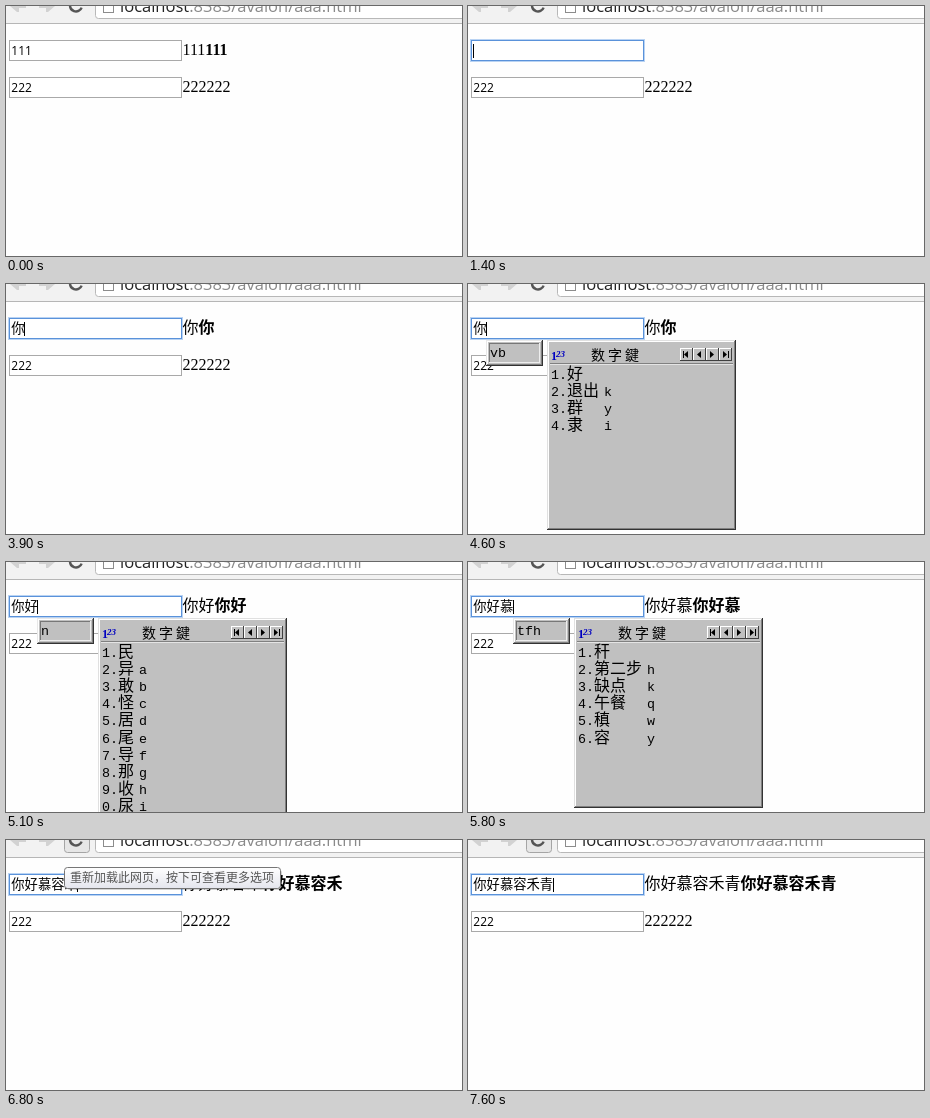
An HTML page with a canvas for the animation above (8000 ms loop, 456x250 px).

```html
<!DOCTYPE html>
<html lang="zh">
<head>
<meta charset="utf-8">
<style>
  html, body { margin: 0; width: 100%; height: 100%; overflow: hidden; background: #fefefe; }
  canvas { display: block; }
</style>
</head>
<body>
<canvas id="stage" width="456" height="250"></canvas>
<script>
const c = document.getElementById('stage').getContext('2d');
const CJK = '"Noto Sans CJK SC", "Noto Sans CJK", sans-serif';
const PAGE = '"Liberation Serif", "Noto Sans CJK SC", serif';
const UI = '"Open Sans", ' + CJK;
const MONO = '"Liberation Mono", monospace';
const LOOP = 8000;

// Candidate lists: "word code" entries
const LISTS = {
  w: '人,代 a,他 b,公 c,估 d,仍 e,会 f,全 g,个 h,介 i',
  wq: '你,欠 b,仰 b,歉 w,伤 l,余 y',
  v: '发,好 b,妈 c,姑 d,妥 e,妹 f,姨 g,奶 h,婚 i,女 j',
  vb: '好,退出 k,群 y,隶 i',
  n: '民,异 a,敢 b,怪 c,居 d,尾 e,导 f,那 g,收 h,尿 i',
  ng: '慢,忆 n,懂 a,悟 k,恒 j,惜 a',
  ngk: '慕,属于 g,惯 m,怀 i',
  ngkd: '慕,改善 u',
  t: '和,长 a,季 b,么 c,知 d,秀 e,行 f,生 g,处 h,秒 i',
  tf: '行,先 q,午 j,告 k,乘 u,科 f',
  tfh: '秆,第二步 h,缺点 k,午餐 q,稹 w,容 y',
  g: '一,开 a,屯 b,到 c,天 d,表 e,于 f,五 g,下 h,不 i',
  gh: '下,理 f,政 t,整 g,玩 q,禾 d',
  ghd: '禾,整 g,丙 w',
  u: '产,并 a,闻 b,冯 c,关 d,前 e,半 f,着 g,站 h,冰 i',
  ug: '关,美 d,差 a,养 j,青 u'
};

// [time, field text, pending input code]
const STEPS = [
  [0, '111'], [1200, '11'], [1300, '1'], [1400, ''],
  [2100, 'd'], [2200, 'dd'], [2300, 'ddd'], [2400, 'dddd'], [2600, 'ddddd'],
  [2800, 'dddd'], [2900, 'ddd'], [3000, 'dd'], [3100, 'd'], [3200, ''],
  [3700, '', 'w'], [3800, '', 'wq'], [3900, '你'],
  [4500, '你', 'v'], [4600, '你', 'vb'], [4700, '你好'],
  [5100, '你好', 'n'], [5200, '你好', 'ng'], [5300, '你好', 'ngk'], [5400, '你好', 'ngkd'],
  [5500, '你好慕'], [5600, '你好慕', 't'], [5700, '你好慕', 'tf'], [5800, '你好慕', 'tfh'],
  [5900, '你好慕容'], [6000, '你好慕容', 'g'], [6100, '你好慕容', 'gh'], [6200, '你好慕容', 'ghd'],
  [6300, '你好慕容禾'], [7400, '你好慕容禾', 'u'], [7500, '你好慕容禾', 'ug'], [7600, '你好慕容禾青']
];

function rect(x, y, w, h, color) {
  c.fillStyle = color;
  c.fillRect(x, y, w, h);
}

function frame(x, y, w, h, color) {
  c.strokeStyle = color;
  c.lineWidth = 1;
  c.strokeRect(x + .5, y + .5, w - 1, h - 1);
}

function text(s, x, y, font, color = '#000') {
  c.font = font;
  c.fillStyle = color;
  c.fillText(s, x, y);
  return x + c.measureText(s).width;
}

function rounded(x, y, w, h, r, fill, stroke) {
  c.beginPath();
  c.roundRect(x + .5, y + .5, w - 1, h - 1, r);
  c.fillStyle = fill;
  c.fill();
  c.strokeStyle = stroke;
  c.lineWidth = 1;
  c.stroke();
}

function poly(points, color) {
  c.beginPath();
  points.forEach(([x, y]) => c.lineTo(x, y));
  c.fillStyle = color;
  c.fill();
}

function bevel(x, y, w, h, light, dark) {
  rect(x, y, w, h, dark);
  rect(x, y, w - 1, h - 1, light);
  rect(x + 1, y + 1, w - 2, h - 2, '#c0c0c0');
}

function toolbar(hover) {
  rect(0, 0, 456, 17, '#f2f2f2');
  rect(0, 17, 456, 1, '#b6b6b6');
  rounded(89, -12, 380, 25, 3, '#fff', '#b8b8b8');
  if (hover) rounded(58, -12, 26, 25, 3, '#e6e6e6', '#a5a5a5');
  poly([[4, 0], [20, 0], [20, 2], [13, 2], [13, 6], [11, 6]], '#d2d2d2');
  poly([[33, 0], [49, 0], [42, 6], [40, 6], [40, 2], [33, 2]], '#d2d2d2');
  c.beginPath();
  c.arc(70, -.5, 6, .35, Math.PI);
  c.strokeStyle = '#555';
  c.lineWidth = 2.4;
  c.stroke();
  frame(97, -8, 11, 15, '#8c8c8c');
  const x = text('localhost', 114, 6, '16.5px ' + UI, '#222');
  text(':8383/avalon/aaa.html', x, 6, '16.5px ' + UI, '#8a8a8a');
}

function field(y, value, focused) {
  rect(3, y, 173, 21, '#fff');
  if (focused) {
    frame(2, y - 1, 175, 23, '#b9d3f3');
    frame(3, y, 173, 21, '#5a92da');
  } else {
    frame(3, y, 173, 21, '#a9a9a9');
  }
  const font = value > '\u00ff' ? '13.3px ' + CJK : '12px ' + UI;
  const end = text(value, 5.3, y + 15, font);
  const caret = Math.floor(end);
  if (focused) rect(caret, y + 4, 1, 14, '#000');
  return caret;
}

function output(value, y, bold) {
  const x = text(value, 176.5, y, '16px ' + PAGE);
  text(value, x, y, (bold ? 'bold ' : '') + '16px ' + PAGE);
}

function pager(x, y) {
  for (let i = 0; i < 4; i++) {
    const l = x + i * 13.3 | 0, d = i < 2 ? -1 : 1, m = l + 6;
    bevel(l, y, 13, 13, '#fff', '#404040');
    poly([[m - 2 * d, y + 3], [m + 2 * d, y + 6.5], [m - 2 * d, y + 10]], '#000');
    if (i % 3 == 0) rect(m + 3 * d, y + 3, 1, 7, '#000');
  }
}

function ime(x, code) {
  bevel(x, 56, 57, 26, '#e8e8e8', '#333');
  bevel(x + 1, 57, 55, 24, '#fff', '#808080');
  bevel(x + 3, 59, 51, 20, '#777', '#eee');
  text(code, x + 4, 73, '13.33px ' + MONO);

  const l = x + 61, rows = LISTS[code].split(',').map(s => s.split(' '));
  const h = rows.length > 9 ? 200 : 190;
  bevel(l, 56, 189, h, '#e0e0e0', '#333');
  bevel(l + 1, 57, 187, h - 2, '#fff', '#808080');
  rect(l + 3, 79, 183, 1, '#808080');
  rect(l + 3, 80, 183, 1, '#e4e4e4');
  text('1', l + 4, 76, 'bold 12px "Liberation Serif", serif', '#0000c0');
  text('23', l + 9, 73, 'italic bold 9px "Liberation Serif", serif', '#0000c0');
  [...'数字鍵'].forEach((ch, i) => text(ch, l + 44 + i * 17, 76, '14px ' + CJK));
  pager(l + 133, 64);

  const codeX = l + 25 + 16 * Math.max(...rows.map(r => r[0].length));
  rows.forEach(([word, key = ''], i) => {
    const y = 95 + i * 17.1;
    text((i + 1) % 10 + '.', l + 4, y, '13.33px ' + MONO);
    text(word, l + 20, y, '16px ' + CJK);
    text(key, codeX, y, '13.33px ' + MONO);
  });
}

function tooltip(alpha) {
  c.globalAlpha = alpha;
  rounded(60, 29, 216, 21, 3, 'rgba(0,0,0,.2)', 'rgba(0,0,0,.08)');
  const g = c.createLinearGradient(0, 27, 0, 48);
  g.addColorStop(0, '#fff');
  g.addColorStop(1, '#e5e6ee');
  rounded(58, 27, 217, 22, 3, g, '#767676');
  text('重新加载此网页，按下可查看更多选项', 64, 42, '12px ' + CJK, '#575757');
  c.globalAlpha = 1;
}

function draw(t) {
  const [, value, code] = STEPS.findLast(s => s[0] <= t);
  rect(0, 0, 456, 250, '#fefefe');
  toolbar(t >= 6400);
  const caret = field(34, value, t >= 800);
  output(value, 49, true);
  field(71, '222', false);
  output('222', 86, false);
  if (code) ime(caret, code);
  if (t >= 6700 && t < 7000) tooltip(t >= 6800 && t < 6900 ? 1 : .5);
}

const start = performance.now();
function tick() {
  draw((performance.now() - start) % LOOP);
  requestAnimationFrame(tick);
}
tick();
</script>
</body>
</html>
```
